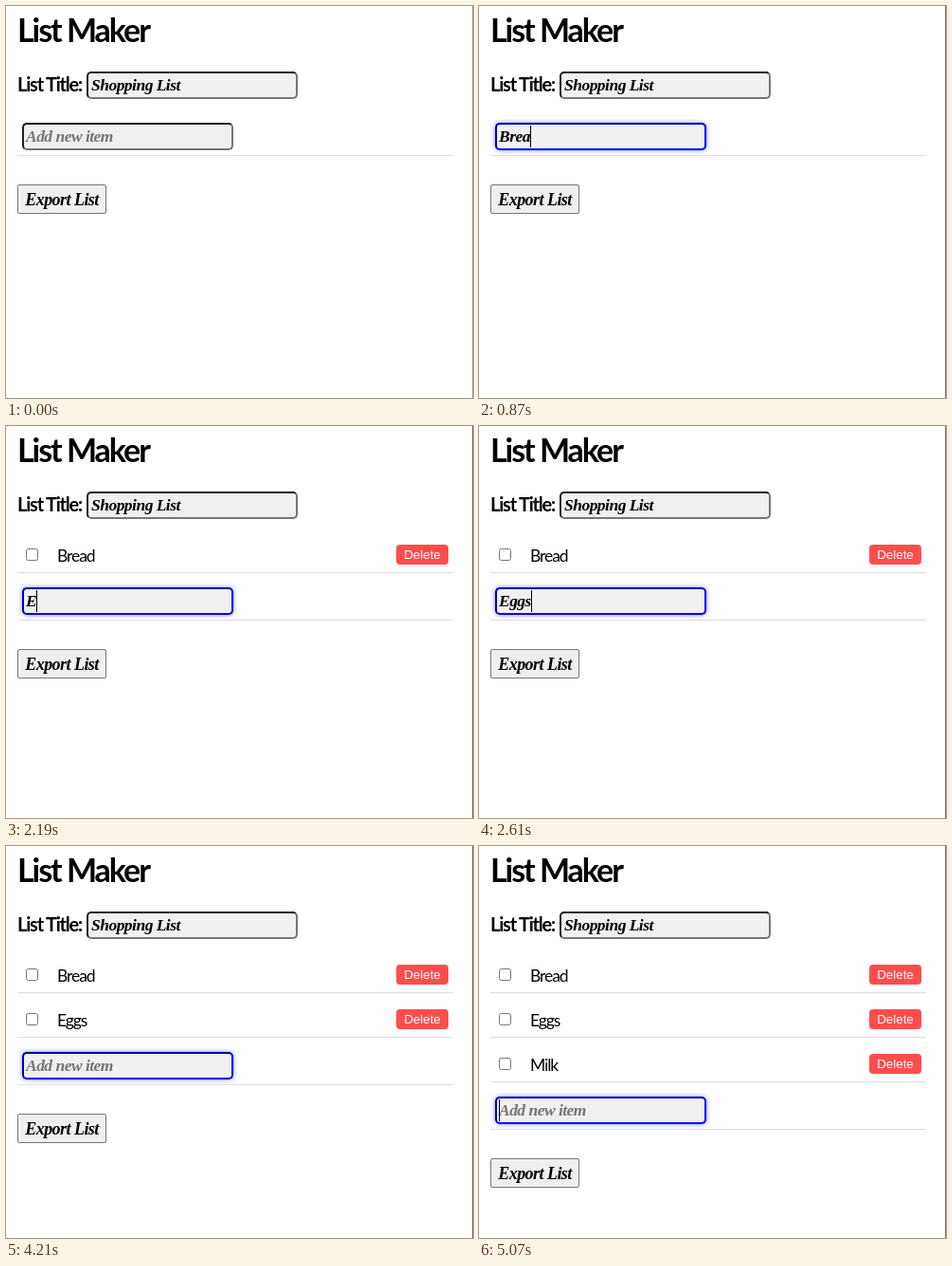
Write an HTML page that moves like this. It is 493x413 px and loops after 5140 ms.

```html
<!DOCTYPE html>
<html lang="en">
<head>
<meta charset="utf-8">
<title>List Maker</title>
<style>
html, body { margin: 0; width: 100%; height: 100%; overflow: hidden; background: #fff; }
#stage { position: relative; width: 493px; height: 413px; overflow: hidden; color: #000;
  font: 17.5px/30px Lato, sans-serif; white-space: pre; }
#stage * { box-sizing: border-box; }
#stage > *, .row > * { position: absolute; margin: 0; }
h1, .label, .name { letter-spacing: -.06em; }
h1 { left: 12px; top: 0; font-size: 34px; line-height: 50px; font-weight: 700; }
.label { left: 12px; top: 67px; font-size: 20px; font-weight: 700; }
.field, .export { font-family: "Liberation Serif", "Times New Roman", serif;
  font-style: italic; font-weight: 700; letter-spacing: -.03em; }
.field { width: 223px; height: 29px; padding-left: 3px; background: #f0f0f0;
  border: 2px inset #767676; border-radius: 5px; font-size: 17.5px; line-height: 25px; }
.title { left: 85px; top: 69px; }
#input { left: 17px; padding-left: 2px; }
#input.focus { border-color: #00f; box-shadow: 0 0 5px rgba(0, 0, 255, .5); }
#input.empty { color: #757575; }
#caret { position: absolute; top: 1px; width: 1px; height: 23px; background: #000; }
.line { left: 12px; width: 460px; height: 1px; background: #ddd; }
.export { left: 12px; width: 94px; height: 31px; padding-top: 1px; text-align: center;
  font-size: 18px; line-height: 29px; background: #efefef; border: 1px solid #767676; border-radius: 2px; }
.row { left: 0; width: 100%; height: 47px; }
.box { left: 21px; top: 14px; width: 13px; height: 13px; background: #fff;
  border: 1px solid #767676; border-radius: 2.5px; }
.name { left: 54px; top: 7px; }
.delete { left: 412px; top: 10px; width: 55px; height: 21px; background: #ff4d4d; color: #fff;
  border-radius: 4px; text-align: center; font: 13.333px/21px "Liberation Sans", Arial, sans-serif; }
.row .line { top: 39px; }
#edge { right: 0; top: 0; width: 1px; height: 100%; }
</style>
</head>
<body>
<div id="stage">
  <h1>List Maker</h1>
  <div class="label">List Title:</div>
  <div class="field title">Shopping List</div>
  <div class="field" id="input"><span id="text"></span><i id="caret"></i></div>
  <div class="line" id="rule"></div>
  <div class="export" id="export">Export List</div>
  <div id="edge"></div>
</div>
<script>
const LOOP = 5140, ROW = 47;
const $ = id => document.getElementById(id);
const items = ["Bread", "Eggs", "Milk"];

const rows = items.map((name, i) => {
  const row = document.createElement("div");
  row.className = "row";
  row.style.top = 115 + ROW * i + "px";
  row.innerHTML = '<div class="box"></div><div class="name">' + name +
    '</div><div class="delete">Delete</div><div class="line"></div>';
  $("stage").append(row);
  return row;
});

// Keystroke times for each item, then the Enter key.
const keys = [
  { type: [480, 680, 780, 870, 1070], enter: 1130 },
  { type: [2190, 2340, 2540, 2610], enter: 2880 },
  { type: [4340, 4540, 4640, 4740], enter: 5070 }
];
// Caret visibility switches, starting hidden.
const blinks = [410, 1130, 1660, 3150, 3680, 4210, 4340];
const ACTIVE = 70, FOCUS = 140;

const passed = (times, t) => times.filter(x => x <= t).length;

function draw(t) {
  const done = passed(keys.map(k => k.enter), t);
  const typed = done < items.length ? items[done].slice(0, passed(keys[done].type, t)) : "";
  const shift = ROW * done;

  rows.forEach((row, i) => row.style.display = i < done ? "block" : "none");
  $("input").style.top = 123 + shift + "px";
  $("rule").style.top = 157 + shift + "px";
  $("export").style.top = 188 + shift + "px";

  $("input").classList.toggle("focus", t >= FOCUS);
  $("input").classList.toggle("empty", !typed);
  $("text").textContent = typed || "Add new item";
  $("caret").style.left = typed ? "" : "2px";
  $("caret").style.visibility = passed(blinks, t) % 2 ? "visible" : "hidden";
  $("edge").style.background = t < ACTIVE ? "#aaa" : "#777";
}

const start = performance.now();
function tick() {
  draw((performance.now() - start) % LOOP);
  requestAnimationFrame(tick);
}
draw(0);
requestAnimationFrame(tick);
</script>
</body>
</html>
```
